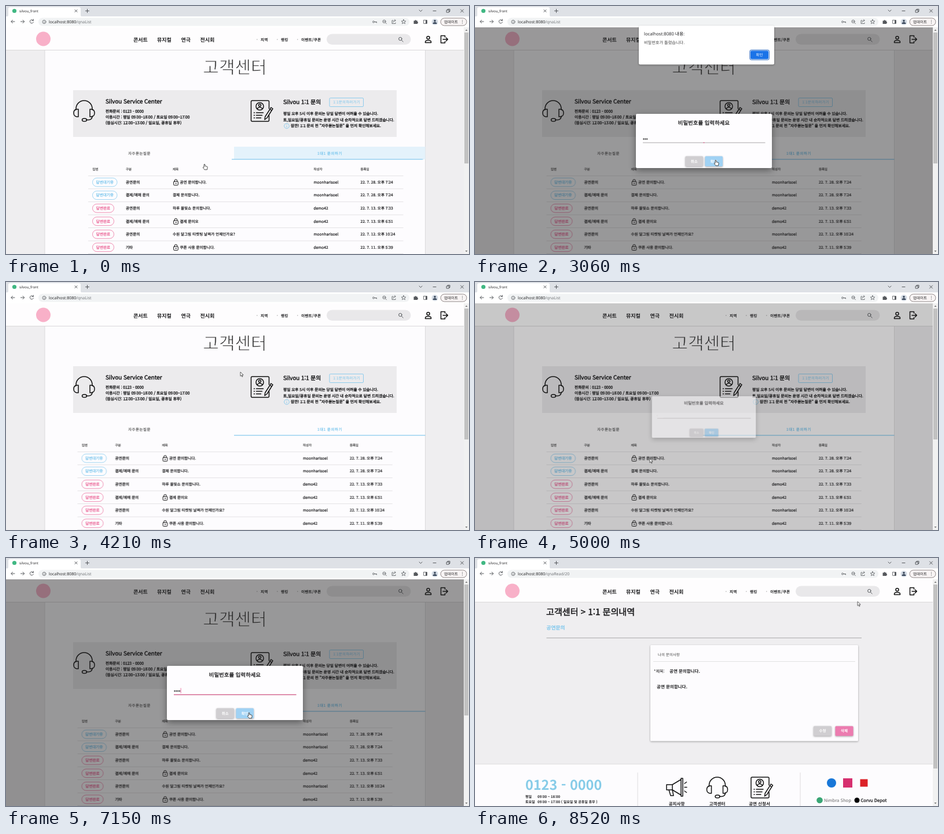
An HTML page that plays this animation: 800 by 430 pixels, repeating every 8560 ms.

```html
<!DOCTYPE html>
<html lang="ko">
<head>
<meta charset="utf-8">
<title>silvou_front</title>
<style>
html, body { margin: 0; width: 100%; height: 100%; overflow: hidden; background: #efeef0; }
svg.stage { display: block; width: 100vw; height: 100vh; }
text { font-family: "Noto Sans CJK KR", "Noto Sans CJK", sans-serif; font-size: 6.6px; color: #1d1d1f; fill: currentColor; text-rendering: geometricPrecision; }
.ui { font-family: "Open Sans", "Noto Sans CJK KR", sans-serif; }
.b { font-weight: 700; }
/* a medium weight, between regular and bold */
.m { stroke: currentColor; stroke-width: .035em; }
/* a light weight: regular trimmed by the paper colour */
.light { font-size: 30px; color: #222; stroke: #fdfcfe; stroke-width: .032em; }
.mid { text-anchor: middle; }
.white { color: #fff; }
.blue { color: #77c4ec; }
.line { fill: none; stroke: #111; stroke-width: 1.5; stroke-linecap: round; stroke-linejoin: round; }
.thin { fill: none; stroke: #55585c; stroke-width: 1; stroke-linecap: round; stroke-linejoin: round; }
.nav text { font-size: 9px; font-weight: 700; }
.nav .s { font-size: 6.7px; letter-spacing: .15px; }
.tab { font-size: 6.4px; letter-spacing: .57px; }
.info text { font-size: 6.7px; stroke: currentColor; stroke-width: .05em; }
.info .h { font-size: 9.8px; }
.shadow { filter: drop-shadow(0 1px 1.5px rgba(0,0,0,.35)); }
.deep { filter: drop-shadow(0 4px 6px rgba(0,0,0,.4)); }

.anim { animation: 8560ms linear infinite; }
.step { animation-timing-function: step-end; }
.list { animation-name: list; }
.read { animation-name: read; }
.slide { animation-name: slide; animation-timing-function: ease-out; }
.bar { animation-name: bar; animation-timing-function: ease-out; }
.glow { animation-name: glow; }
.dim { animation-name: dim; animation-timing-function: cubic-bezier(.25,.8,.5,1); }
.dialog { animation-name: dialog; animation-timing-function: cubic-bezier(.25,.8,.5,1); transform-origin: 395.5px 234px; }
.focus { animation-name: focus; animation-timing-function: cubic-bezier(.25,.8,.5,1); transform-origin: 395.5px 237px; }
.type { animation-name: type; }
.caret { animation-name: caret; }
.alert { animation-name: alert; }
.hand { animation-name: hand; }
.arrow { animation-name: arrow; }
.pointer { animation-name: pointer; animation-timing-function: ease-in-out; }

@keyframes list { 0% { opacity: 1 } 86.45%, 100% { opacity: 0 } }
@keyframes read { 0% { opacity: 0 } 86.45%, 100% { opacity: 1 } }
@keyframes slide { 0%, .3% { transform: translateX(18.5px) } 1.9%, 100% { transform: none } }
@keyframes bar { 0%, .3% { transform: translateX(-4.5px) } 1.6%, 100% { transform: none } }
@keyframes glow { 0%, 1% { opacity: 1 } 3.5%, 100% { opacity: 0 } }
@keyframes dim {
  0%, 7.477% { opacity: 0 } 10.981%, 43.692% { opacity: 1 }
  47.196%, 57.687% { opacity: 0 } 61.192%, 85.631% { opacity: 1 }
  89.136%, 100% { opacity: 0 }
}
@keyframes dialog {
  0%, 7.477% { opacity: 0; transform: scale(.5) } 10.981%, 43.692% { opacity: 1; transform: scale(1) }
  47.196%, 57.687% { opacity: 0; transform: scale(.5) } 61.192%, 85.631% { opacity: 1; transform: scale(1) }
  89.136%, 100% { opacity: 0; transform: scale(.5) }
}
@keyframes focus {
  0%, 15.771% { transform: scaleX(0) } 19.276%, 29.79% { transform: scaleX(1) }
  31.542%, 43.692% { transform: scaleX(.01) } 47.196%, 61.332% { transform: scaleX(0) }
  64.836%, 86.449% { transform: scaleX(1) } 89.136%, 100% { transform: scaleX(0) }
}
@keyframes type {
  0% { transform: translateX(0) } 18.69% { transform: translateX(2.9px) } 21.61% { transform: translateX(5.8px) }
  23.95% { transform: translateX(8.7px) } 47.2% { transform: translateX(0) }
  64.49% { transform: translateX(2.9px) } 66.36% { transform: translateX(5.8px) }
  68.22% { transform: translateX(8.7px) } 70.09% { transform: translateX(11.6px) }
  89.14%, 100% { transform: translateX(0) }
}
@keyframes caret {
  0% { opacity: 0 } 15.77% { opacity: 1 } 29.79% { opacity: 0 } 61.33% { opacity: 1 }
  76.28% { opacity: 0 } 82.48% { opacity: 1 } 86.45%, 100% { opacity: 0 }
}
@keyframes alert { 0% { opacity: 0 } 31.54% { opacity: 1 } 43.46%, 100% { opacity: 0 } }
@keyframes hand {
  0% { opacity: 1 } 1.75% { opacity: 0 } 28.4% { opacity: 1 } 36.57% { opacity: 0 }
  79.2% { opacity: 1 } 86.68%, 100% { opacity: 0 }
}
@keyframes arrow {
  0% { opacity: 0 } 1.75% { opacity: 1 } 28.4% { opacity: 0 } 36.57% { opacity: 1 }
  79.2% { opacity: 0 } 86.68%, 100% { opacity: 1 }
}
@keyframes pointer {
  0%, 1.75% { transform: translate(343px, 274px) }
  6.43%, 8.64% { transform: translate(303px, 306px) }
  12.73% { transform: translate(354px, 249px) }
  15.77%, 25.12% { transform: translate(372px, 231px) }
  28.97%, 36.8% { transform: translate(416px, 267px) }
  41.47%, 43.81% { transform: translate(491px, 83px) }
  49.18% { transform: translate(405px, 156px) }
  54.91%, 58.41% { transform: translate(302px, 306px) }
  61.33%, 73.6% { transform: translate(372px, 231px) }
  80.02%, 86.45% { transform: translate(420px, 268px) }
  98.13%, 100% { transform: translate(661px, 75.5px) }
}
</style>
</head>
<body>
<svg class="stage" viewBox="0 0 800 430" xmlns="http://www.w3.org/2000/svg">
  <defs>
    <g id="headset" class="line">
      <path d="M5 17v-2a14 14 0 0 1 28 0v2M33 28q0 6-6 6.500h-4"/>
      <path d="M9 16v13h-3q-5-1-5-6.500t5-6.500zM29 16v13h3q5-1 5-6.500t-5-6.500z"/>
      <ellipse cx="19.500" cy="34.500" rx="4" ry="2.500"/>
    </g>
    <g id="form" class="line">
      <path d="M32 27v8q0 2-2 2H3q-2 0-2-2V3q0-2 2-2h27q2 0 2 2v12"/>
      <circle cx="16" cy="11" r="6.500"/><circle cx="16" cy="9" r="2"/>
      <path d="M11.500 15q4.500-5 9 0M6 22h1m3 0h12M6 26.500h1m3 0h10M6 31h1m3 0h8"/>
      <path d="M35.500 13l3 2-10 16-4 3 .7-5zM33.500 16l3 2"/>
    </g>
    <g id="lock" class="line" style="stroke-width:1">
      <rect x=".7" y="3.500" width="7.600" height="6.500" rx=".8"/>
      <path d="M2.300 3.500v-1.300a2.200 2.200 0 0 1 4.400 0v1.300"/><circle cx="4.500" cy="6.700" r=".5"/>
    </g>
  </defs>

  <!-- page base and browser frame -->
  <rect width="800" height="430" fill="#efeef0"/>
  <rect width="800" height="19" fill="#dee1e6"/>
  <path d="M1 18.500q3 0 3-3V5q0-3 3-3h119q3 0 3 3v10.500q0 3 3 3z" fill="#fff"/>
  <rect y="18" width="800" height="19" fill="#fff"/>
  <circle cx="14.500" cy="8.500" r="3.600" fill="#41b883"/>
  <text class="ui" x="23" y="10.700" style="font-size:6.050px">silvou_front</text>
  <g class="thin">
    <path d="M119 6.500l4 4m0-4l-4 4M137.500 8.500h6m-3-3v6M714 7l2.500 2.500L719 7M738 8.500h5M785.500 6l5 5m0-5l-5 5"/>
    <path d="M761.500 7h4v4h-4zM763 7V5.500h4v4h-1.500"/>
    <path d="M15 27H9m2.500-2.700L8.800 27l2.700 2.700M25.500 27h6m-2.500-2.700l2.700 2.700-2.700 2.700M47 25a3.100 3.100 0 1 0 .4 3M47.300 23v2.300H45"/>
  </g>
  <rect x="56" y="20.500" width="641" height="14" rx="7" fill="#f1f3f4"/>
  <g class="thin" style="stroke-width:.8">
    <circle cx="66" cy="27.500" r="3"/><path d="M66 27.500v1.500M66 25.900v.1"/>
    <circle cx="635" cy="27.500" r="1.500"/><path d="M636.500 27.500h4v1.500m-1.500-1.500v1"/>
    <circle cx="653.500" cy="26.800" r="2.600"/><path d="M655.500 28.800l2 2M652.300 26.800h2.400"/>
    <path d="M669 25h-2v5.500h6V29M669 28.500q0-3.500 4-3.500m-1.500-1.500l1.700 1.500-1.700 1.500"/>
    <path d="M687 23.500l1.100 2.500 2.700.2-2.100 1.700.7 2.700-2.400-1.500-2.400 1.500.7-2.700-2.100-1.700 2.700-.2z"/>
    <rect x="721.500" y="24.500" width="6" height="6" rx=".5"/>
  </g>
  <path d="M704.500 25.500h2a1.200 1.200 0 0 1 2.400 0h2v2a1.200 1.200 0 0 1 0 2.400v1.100h-6.400z" fill="#55585c"/>
  <rect x="725" y="24.500" width="2.500" height="6" fill="#55585c"/>
  <circle cx="741" cy="27.500" r="5.500" fill="#d5dce5"/>
  <circle cx="741" cy="25.700" r="1.800" fill="#39475a"/><path d="M737.500 31q0-3 3.500-3t3.500 3z" fill="#39475a"/>
  <rect x="751" y="21" width="45" height="13" rx="6.500" fill="#f8f4f4" stroke="#756a6a" stroke-width=".8"/>
  <text x="757" y="29.700" style="font-size:6.500px">업데이트</text>
  <path d="M788.500 24.800v.1m0 2.500v.1m0 2.500v.1" class="thin" style="stroke-width:1.200"/>
  <rect x="791" y="37" width="9" height="393" fill="#f1f1f1"/>
  <path d="M793.500 43l2-2.500 2 2.500zM793.500 424l2 2.500 2-2.500z" fill="#777"/>

  <!-- inquiry list -->
  <g class="anim step list">
    <text class="ui" x="74" y="30" style="font-size:7px">localhost:8080<tspan fill="#6a6d71">/qnaList</tspan></text>
    <rect x="792" y="46" width="7" height="227" fill="#c1c1c1"/>
    <rect x="67" y="76" width="657.500" height="356" fill="#fdfcfe" stroke="#d4d3d5" stroke-width=".8"/>
    <text class="mid light" x="395.500" y="117.200">고객센터</text>
    <rect x="116" y="146" width="559" height="81" fill="#ecebed"/>
    <use href="#headset" x="116" y="163"/>
    <use href="#form" x="422.500" y="163"/>
    <g class="info">
      <text class="h" x="172" y="168.500">Silvou Service Center</text>
      <text x="172" y="184.500">전화문의 : 0123 - 0000</text>
      <text x="172" y="194.900">이용시간 : 평일 09:00~18:00 / 토요일 09:00~17:00</text>
      <text x="172" y="205.300">(점심시간: 12:00~13:00 / 일요일, 공휴일 휴무)</text>
      <text class="h" x="479" y="169.500">Silvou 1:1 문의</text>
      <text x="479" y="189.300">평일 오후 5시 이후 문의는 당일 답변이 어려울 수 있습니다.</text>
      <text x="479" y="199.700">토,일요일/공휴일 문의는 운영 시간 내 순차적으로 답변 드리겠습니다.</text>
      <text x="492" y="210.100">잠깐! 1:1 문의 전 "자주묻는질문" 을 먼저 확인해보세요.</text>
    </g>
    <g fill="none" stroke="#77c4ec" stroke-width=".8">
      <circle cx="485" cy="208" r="4.300"/><path d="M485 207.500v3M485 205.300v.9"/>
      <rect x="559" y="159.500" width="58.500" height="15" rx="1.500"/>
    </g>
    <text class="mid blue" x="588.500" y="169.300" style="font-size:6.500px;letter-spacing:.2px">1:1문의하러가기</text>

    <rect class="anim glow" x="394" y="244" width="330.500" height="22" fill="#e4f2fb"/>
    <text class="mid tab m" x="230.500" y="257.600" style="color:#666">자주묻는질문</text>
    <text class="mid tab m blue" x="559.500" y="257.600">1대1 문의하기</text>
    <rect class="anim bar" x="394" y="265.300" width="330.500" height="1.100" fill="#77c4ec"/>
    <g class="anim slide" id="table"></g>
  </g>

  <!-- inquiry detail -->
  <g class="anim step read">
    <text class="ui" x="74" y="30" style="font-size:7px">localhost:8080<tspan fill="#6a6d71">/qnaRead/20</tspan></text>
    <rect x="792" y="46" width="7" height="319" fill="#c1c1c1"/>
    <text class="m" x="123" y="98.500" style="font-size:15.100px">고객센터 &gt; 1:1 문의내역</text>
    <text class="m blue" x="123.500" y="124.300" style="font-size:8.700px">공연문의</text>
    <rect x="123.500" y="138.300" width="544.500" height=".8" fill="#999"/>
    <rect class="shadow" x="303" y="151" width="359" height="166.500" rx="1.500" fill="#fdfcfe"/>
    <text x="316" y="169.500" style="font-size:6.500px;color:#444">나의 문의사항</text>
    <rect x="308" y="179" width="349" height=".8" fill="#ddd"/>
    <text x="309" y="199.300" style="font-size:7.300px">*제목:</text>
    <text class="b" x="336" y="199.300" style="font-size:7.500px">공연 문의합니다.</text>
    <text class="b" x="314" y="226.300" style="font-size:7.500px">공연 문의합니다.</text>
    <g class="shadow">
      <rect x="585" y="291.500" width="31" height="17" rx="1.500" fill="#d0ced1"/>
      <rect x="622.500" y="291.500" width="31" height="17" rx="1.500" fill="#ec7cb0"/>
    </g>
    <text class="mid b white" x="600.500" y="302.400">수정</text>
    <text class="mid b white" x="638" y="302.400">삭제</text>

    <rect y="357" width="791" height="73" fill="#fdfcfe"/>
    <path d="M0 357.300h791M281 372v58M562 372v58" stroke="#d6d5d7" stroke-width=".8"/>
    <text class="b" x="87" y="401.700" style="font-size:23.400px;color:#87cce8">0123 - 0000</text>
    <g class="b">
      <text x="87" y="415.700" style="font-size:6px">평일</text>
      <text x="108" y="415.700" style="font-size:6px">09:00 ~ 18:00</text>
      <text x="87" y="425.200" style="font-size:6px">토요일</text>
      <text x="108" y="425.200" style="font-size:6px">09:00 ~ 17:00 ( 일요일 및 공휴일 휴무 )</text>
      <g class="mid">
        <text x="348.500" y="428.700" style="font-size:7.500px">공지사항</text>
        <text x="418.500" y="428.700" style="font-size:7.500px">고객센터</text>
        <text x="491.500" y="428.700" style="font-size:7.500px">공연 신청서</text>
      </g>
    </g>
    <g class="line" transform="translate(330 380)">
      <path d="M1 13h10L26 4v27L11 22H1zM11 13v9M5 22l3 10h5l-2-10M26 2v31h3V2zM32 17.500h4M32 11l3.500-2.500M32 24l3.500 2.500"/>
    </g>
    <use href="#headset" x="399.500" y="379"/>
    <use href="#form" x="476" y="379"/>
    <circle cx="616" cy="390" r="8" fill="#1877d8"/>
    <rect x="636" y="382" width="16" height="16" fill="#d6306f"/>
    <rect x="665.500" y="383.500" width="13" height="13" fill="#dc2228"/>
    <circle cx="595.500" cy="420" r="5.300" fill="#3aa675"/>
    <text x="603" y="422.800" style="font-size:7.600px;color:#666">Nimbra Shop</text>
    <circle cx="660" cy="420" r="4.500"/>
    <text class="m" x="666.500" y="422.800" style="font-size:7.600px">Corvu Depot</text>
  </g>

  <!-- site header -->
  <rect y="37" width="791" height="39.500" fill="#fefdfe"/>
  <rect y="76" width="791" height=".8" fill="#d2d1d3"/>
  <circle cx="64.500" cy="57" r="12.500" fill="#f8b0c8"/>
  <g class="nav">
    <text x="220" y="61.600">콘서트</text><text x="261" y="61.600">뮤지컬</text>
    <text x="302.500" y="61.600">연극</text><text x="335.500" y="61.600">전시회</text>
    <text class="s" x="440" y="60.700">지역</text><text class="s" x="475" y="60.700">랭킹</text><text class="s" x="510" y="60.700">이벤트/쿠폰</text>
  </g>
  <path d="M433 58h1.500M468 58h1.500M503 58h1.500" stroke="#999"/>
  <rect x="554" y="48.500" width="145.500" height="18.500" rx="9.250" fill="#e9e8ea"/>
  <g class="thin"><circle cx="681.300" cy="57" r="2.700"/><path d="M683.400 59.200l2.800 2.800"/></g>
  <g class="line">
    <circle cx="729.500" cy="55" r="2.500"/><path d="M724.500 63.500v-1q0-3 5-3t5 3v1z"/>
    <path d="M758.500 54v-2.500h-7v12.500h7V61.500M755 57.800h8m-2.500-2.800l2.800 2.800-2.800 2.800"/>
  </g>

  <g class="anim dim"><rect y="37" width="791" height="393" fill="#212121" fill-opacity=".46"/></g>

  <!-- password dialog -->
  <g class="anim dialog">
    <rect class="deep" x="278" y="187" width="235" height="94" rx="2" fill="#fefdff"/>
    <text class="mid m" x="395.500" y="205.700" style="font-size:9.300px;letter-spacing:.12px">비밀번호를 입력하세요</text>
    <path d="M290 237h211.500" stroke="#929194" stroke-width=".8"/>
    <rect class="anim focus" x="290" y="236.400" width="211.500" height="1.100" fill="#e8588f"/>
    <path d="M291.400 230.700h9" stroke="#222" stroke-width="2.200" stroke-linecap="round" stroke-dasharray="0 2.900"/>
    <g class="anim step type">
      <rect x="290" y="225" width="14" height="11" fill="#fefdff"/>
      <rect class="anim step caret" x="290" y="225.500" width=".8" height="9" fill="#e8588f"/>
    </g>
    <g class="shadow">
      <rect x="363.500" y="260.500" width="30.500" height="17.500" rx="1.500" fill="#d0ced1"/>
      <rect x="397.500" y="260.500" width="30.500" height="17.500" rx="1.500" fill="#90caf3"/>
    </g>
    <text class="mid b white" x="378.800" y="271.700">취소</text>
    <text class="mid b white" x="412.800" y="271.700">확인</text>
    <rect class="anim step hand" x="397.500" y="260.500" width="30.500" height="17.500" rx="1.500" fill="#fff" fill-opacity=".15"/>
  </g>

  <!-- browser alert -->
  <g class="anim step alert">
    <rect class="shadow" x="283" y="34" width="234" height="67.500" rx="2.500" fill="#fff"/>
    <text class="ui" x="292" y="50.700" style="font-size:7.700px">localhost:8080 내용:</text>
    <text x="292" y="65.600" style="font-size:7.200px;color:#444">비밀번호가 틀렸습니다.</text>
    <rect x="474.800" y="76.300" width="33.500" height="17" rx="2.500" fill="#fff" stroke="#1a5fc0"/>
    <rect x="476" y="77.500" width="31" height="14.600" rx="1.800" fill="#1a73e8"/>
    <text class="mid white" x="491.500" y="87.200" style="font-size:6.500px">확인</text>
  </g>

  <g class="anim pointer">
    <path class="anim step arrow" d="M0 0v7.300l1.700-1.600 1.200 2.700 1.200-.5-1.200-2.700h2.300z" fill="#fff" stroke="#222" stroke-width=".7"/>
    <path class="anim step hand" d="M-.9 5.500V.8q.9-1.500 1.800 0v2.700l3.200.7q1.200.3 1 1.700l-.6 3.900H0L-2.700 6.200q.1-1.300 1.800-.7z" fill="#fff" stroke="#222" stroke-width=".8"/>
  </g>
</svg>
<script>
const rows = [
  // answered, category, locked, title, writer, date
  [0, "공연문의", 1, "공연 문의합니다.", "moonharisoel", "22. 7. 28. 오후 7:24"],
  [0, "결제/예매 문의", 0, "결제 문의합니다.", "moonharisoel", "22. 7. 28. 오후 7:24"],
  [1, "공연문의", 0, "하루 물빛쇼 문의합니다.", "demo42", "22. 7. 13. 오후 7:33"],
  [1, "결제/예매 문의", 1, "결제 문의요", "demo42", "22. 7. 13. 오후 6:51"],
  [1, "공연문의", 0, "수원 달그림 티켓팅 날짜가 언제인가요?", "moonharisoel", "22. 7. 12. 오후 10:24"],
  [1, "기타", 1, "쿠폰 사용 문의합니다.", "demo42", "22. 7. 11. 오후 5:39"]
];
const columns = [131, 188.5, 269.5, 513, 594];
const text = (x, y, str, cls = "m", style = "") =>
  `<text x="${x}" y="${y}" class="${cls}" style="${style}">${str}</text>`;
const rule = y => `<rect x="123.5" y="${y}" width="544.5" height=".7" fill="#d9d8da"/>`;

function row([done, category, locked, title, writer, date], i) {
  const mid = 305.5 + i * 22.55, base = mid + 2.4;
  const color = done ? "#ea5f92" : "#77c4ec", width = done ? 37 : 42.5;
  return `<rect x="131" y="${mid - 7.3}" width="${width}" height="14.8" rx="7.4" fill="none" stroke="${color}" stroke-width=".7"/>`
    + text(131 + width / 2, base, done ? "답변완료" : "답변대기중", "mid m", `color:${color}`)
    + text(columns[1], base, category)
    + (locked ? `<use href="#lock" x="270.5" y="${mid - 4.8}"/>` : "")
    + text(locked ? 282 : columns[2], base, title, locked ? "m" : "b")
    + text(columns[3], base, writer)
    + text(columns[4], base, date)
    + rule(mid + 11.1);
}

const heads = ["답변", "구분", "제목", "작성자", "등록일"];
document.getElementById("table").innerHTML =
  heads.map((h, i) => text(columns[i], 285, h, "m", "font-size:5.5px;color:#555")).join("")
  + rule(294) + rows.map(row).join("");
</script>
</body>
</html>
```
